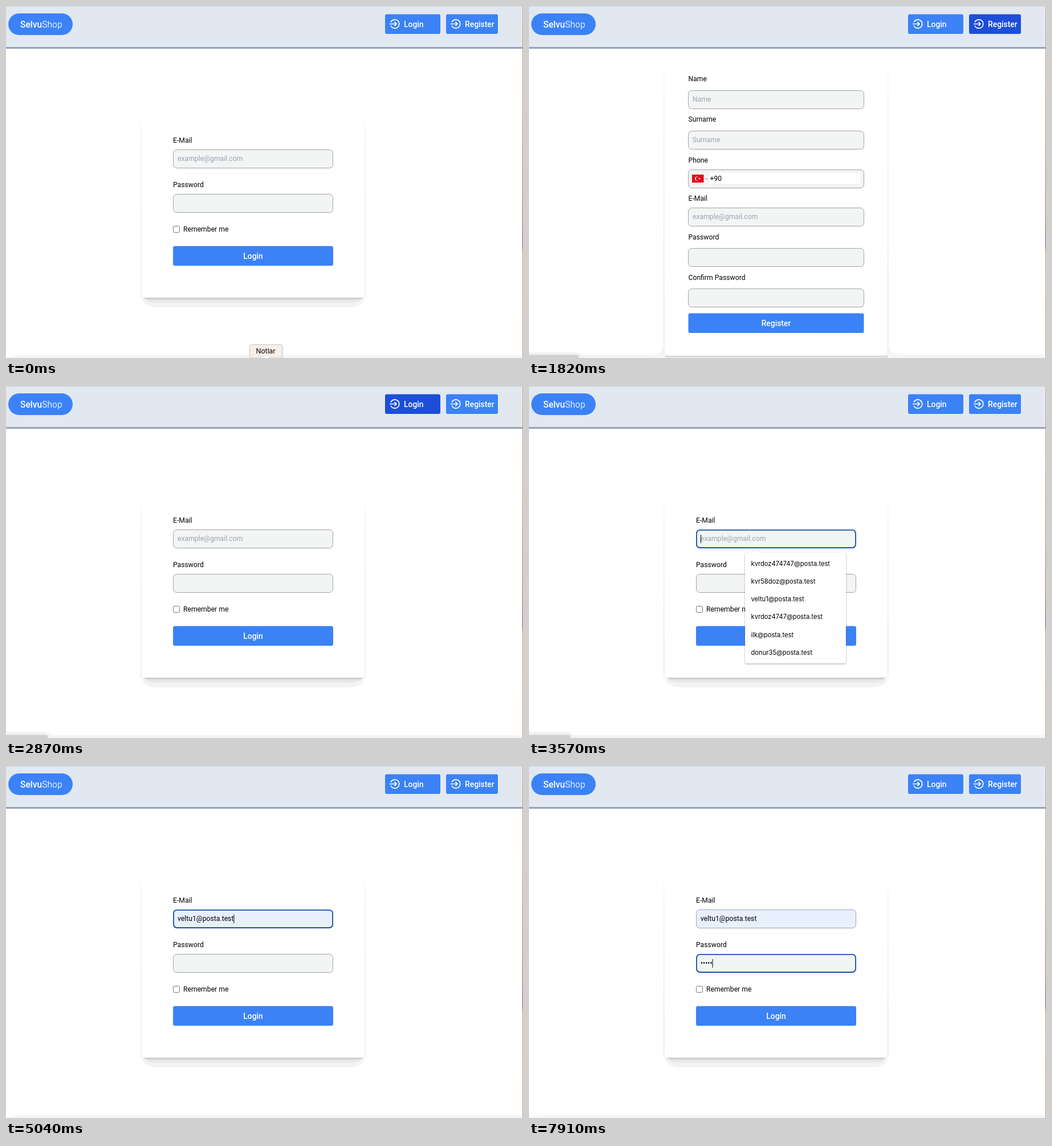
An HTML page that plays this animation: 907 px wide and 618 px high, repeating every 8000 ms.

```html
<!DOCTYPE html>
<html lang="en">
<head>
<meta charset="utf-8">
<title>Login and register</title>
<style>
  html, body { margin: 0; width: 100%; height: 100%; overflow: hidden; background: #fff; }
  svg { display: block; }
  text { font: 12.2px Roboto, sans-serif; white-space: pre; }
  .hint { fill: #9ca3af; }
  .big { font-size: 13.9px; font-weight: 500; fill: #fff; }
  .brand { font-size: 15.6px; font-weight: 500; fill: #fff; }
  .menu { font: 11.2px Inter, sans-serif; }
  .tip { font: 12px Inter, sans-serif; }
  .field { fill: #f3f4f4; stroke: #9ca3af; }
  .popup { filter: drop-shadow(0 1px 1.5px rgba(0, 0, 0, .35)); }
</style>
</head>
<body>
<svg id="stage" width="907" height="618" viewBox="0 0 907 618"></svg>
<script>
const LOOP = 8000, BLUE = '#3b82f6', DARK = '#1d4ed8';
const emails = ['kvrdoz474747', 'kvr58doz', 'veltu1', 'kvrdoz4747', 'ilk', 'donur35']
  .map(user => user + '@posta.test');

const rect = (x, y, w, h, fill, r = 0, more = '') =>
  `<rect x="${x}" y="${y}" width="${w}" height="${h}" fill="${fill}" rx="${r}" ${more}/>`;
const text = (x, y, str, more = '') => `<text x="${x}" y="${y}" ${more}>${str}</text>`;
const path = (d, fill, more = '') => `<path d="${d}" fill="${fill}" ${more}/>`;
const group = (id, body) => `<g id="${id}">${body}</g>`;
const field = (x, y, w, id = '') =>
  `<rect ${id && `id="${id}"`} class="field" x="${x + .5}" y="${y + .5}" width="${w - 1}" height="32" rx="6"/>`;
const wide = (x, y, w, label) =>
  rect(x, y, w, 34.5, BLUE, 3) + text(x + w / 2, y + 22, label, 'class="big" text-anchor="middle"');
const ring = (id, y) =>
  rect(294, y + .8, 279, 31.2, 'none', 6, `id="${id}" stroke="#1452ab" stroke-width="1.8"`);

function navButton(x, w, label, id) {
  return rect(x, 14.5, w, 34.5, BLUE, 3, `id="${id}"`) +
    `<g transform="translate(${x + 6.3} 21.1) scale(.867)" fill="none" stroke="#fff" stroke-width="1.9">
      <path d="M4.4 8.5A8.8 8.8 0 1 1 4.4 15.5M1.8 12H15.5M11.6 7.8L15.8 12L11.6 16.2"/></g>` +
    text(x + 33, 37, label, 'class="big"');
}

// Card sides fade in from the top; its shadow lies in flat bands.
const sides = (top, bottom) => [236, 629].map(x =>
  rect(x, top, 1.5, bottom - top, 'url(#side)')).join('');

const header =
  rect(0, 0, 907, 72, '#e2e8f0') + rect(0, 0, 907, 1, '#cdd3db') + rect(0, 72, 907, 3, '#94a3b8') +
  rect(4, 13, 113, 38, BLUE, 19) +
  text(25, 38, 'Selvu<tspan font-weight="400" fill="#dbeafe">Shop</tspan>', 'class="brand"') +
  navButton(665, 97, 'Login', 'navLogin') + navButton(772, 91, 'Register', 'navRegister');

const loginPage =
  path('M0 618Q10 613 45 613H907V618Z', '#f4f4f4') +
  path('M238 505V512Q241 529 268 529H600Q627 529 629 512V505Z', '#f3f3f3') +
  path('M241 505V512Q246 521 264 521H604Q621 521 626 512V505Z', '#e9e9e9') +
  path('M242 512H626L618 517H250Z', 'url(#edge)') +
  rect(237.5, 200, 391.5, 312, '#fff', 2) + sides(202, 512) +
  text(293, 240.4, 'E-Mail') + field(293, 252, 281, 'email') + ring('emailRing', 252) +
  text(301, 272.3, '', 'id="emailText"') + rect(301, 261, 1, 15, '#000', 0, 'id="emailCaret"') +
  text(293, 318.3, 'Password') + field(293, 330, 281) + ring('passRing', 330) +
  text(301, 350.3, '', 'id="passText"') + rect(301, 339, 1, 15, '#000', 0, 'id="passCaret"') +
  rect(293.5, 386.5, 11, 11, '#fff', 2, 'stroke="#767676"') + text(311, 396.2, 'Remember me') +
  wide(293, 421.5, 281, 'Login');

const star = Array.from({ length: 10 }, (_, i) => {
  const a = Math.PI * (1 + i / 5), r = i % 2 ? .8 : 2;
  return `${299 + r * Math.cos(a)},${303 + r * Math.sin(a)}`;
}).join(' ');

const phone =
  field(279, 287, 309) + rect(317, 293, 264, 19, '#fff') +
  rect(286, 296, 20.5, 14, '#e30a17') +
  '<circle cx="294.5" cy="303" r="3.6" fill="#fff"/><circle cx="295.5" cy="303" r="2.9" fill="#e30a17"/>' +
  `<polygon points="${star}" fill="#fff"/>` +
  path('M309.5 302.5L311.5 304.5L313.5 302.5', 'none', 'stroke="#555" stroke-width=".9"') +
  text(317.5, 307, '+90');

const registerPage =
  path('M0 612H212Q233 611 236 598V618H0ZM907 612H655Q634 611 631 598V618H907Z', '#f5f5f5') +
  rect(238, 610, 392, 8, '#e6e6e6') + rect(239, 613, 390, 2.5, '#cfcfcf') +
  rect(237.5, 108, 391.5, 506, '#fff', 3) + sides(108, 613) +
  [['Name', 128, 148, 'Name'], ['Surname', 199, 219, 'Surname'], ['Phone', 270.3],
   ['E-Mail', 338, 354, 'example@gmail.com'], ['Password', 405.5, 425, ''],
   ['Confirm Password', 476.5, 496, '']].map(([label, mid, y, hint]) =>
    text(279.5, mid + 4.4, label) +
    (y ? field(279, y, 309) + text(287, y + 20.2, hint, 'class="hint"') : phone)).join('') +
  wide(279.5, 539.5, 308, 'Register');

const rowY = i => 296.5 + 31.15 * i;
const menu =
  path('M382 292.5H391L398 286L405 292.5H553Q556 292.5 556 295.5V484Q556 487 553 487H382Q379 487 379 484V295.5Q379 292.5 382 292.5Z',
    '#fff', 'class="popup"') +
  rect(379, 0, 177, 31, '#e9e9ea', 0, 'id="row"') +
  emails.map((mail, i) => text(389.5, rowY(i) + 19.5, mail, 'class="menu"')).join('');

const tip =
  rect(427.5, 594.5, 57.5, 23.5, '#f6efe9', 4, 'stroke="#c9c4bf"') +
  path('M449 618L456 614.5L463 618Z', '#fff') + text(438.5, 610, 'Notlar', 'class="tip"');

const bubble =
  path('M0 607H66Q76 607 82 618H0Z', '#f3f3f3') +
  path('M0 612.5H70Q73 612.5 73 616V618H0Z', '#d0d0d0');
const longBubble =
  path('M0 608H78Q90 608 97 618H0Z', '#f1f1f1') +
  path('M0 612.5H84Q87 612.5 87 616V618H0Z', '#d0d0d0');

const stops = list => list.map(([o, c]) => `<stop offset="${o}" stop-color="${c}"/>`).join('');
const fade = (id, list) =>
  `<linearGradient id="${id}" x1="0" y1="0" x2="0" y2="1">${stops(list)}</linearGradient>`;

document.getElementById('stage').innerHTML =
  '<defs>' + fade('side', [[0, '#fafafa'], [.2, '#efefef'], [1, '#eaeaea']]) +
  fade('edge', [[0, '#c8c8c8'], [1, '#e6e6e6']]) +
  fade('rim', [[0, '#c8a98e'], [.3, '#c58a5e'], [.6, '#a8583c'], [.68, '#8c3a2c'], [.7, '#cf8c58'], [1, '#c99a72']]) +
  '</defs>' + header + group('loginPage', loginPage) + group('registerPage', registerPage) +
  group('menu', menu) + group('bubble', bubble) + group('longBubble', longBubble) +
  group('tip', tip) + rect(906, 0, 1, 618, 'url(#rim)');

const el = id => document.getElementById(id);
const show = (id, on) => el(id).style.display = on ? '' : 'none';
const alpha = (id, a) => el(id).style.opacity = Math.max(0, Math.min(1, a));
const within = (t, a, b) => t >= a && t < b;
const latest = (t, steps) => steps.reduce((v, [start, next]) => t >= start ? next : v, -1);

const hover = [[3780, 0], [3920, 1], [4060, 2], [4200, 3], [4690, 2]];
const keys = [6580, 6790, 7280, 7560, 7840];
const OPEN = 3500, PICK = 4970, PASS = 5810;

function draw(t) {
  const signUp = within(t, 1680, 2730), open = within(t, OPEN, PICK);
  const row = latest(t, hover), filled = row >= 0;

  show('tip', t < 70);
  show('loginPage', !signUp);
  show('registerPage', signUp);
  el('navRegister').setAttribute('fill', within(t, 1400, 2170) ? DARK : BLUE);
  el('navLogin').setAttribute('fill', within(t, 2520, 3150) ? DARK : BLUE);

  show('longBubble', within(t, 1680, 2730));
  alpha('longBubble', (t - 1610) / 140);
  show('bubble', within(t, 2730, 3850));
  alpha('bubble', (3850 - t) / 210);

  show('menu', open);
  show('row', filled);
  el('row').setAttribute('y', rowY(Math.max(row, 0)) - 3 + 2.5);

  const mail = el('emailText');
  mail.textContent = filled ? emails[row] : 'example@gmail.com';
  mail.setAttribute('class', filled ? '' : 'hint');
  el('email').style.fill = filled ? '#e8f0fe' : '';
  show('emailRing', within(t, OPEN, PASS));
  show('emailCaret', within(t, OPEN, 5530));
  if (!signUp) el('emailCaret').setAttribute('x', t < PICK ? 301 : 301 + mail.getComputedTextLength());

  const pass = el('passText');
  pass.textContent = '•'.repeat(keys.filter(k => t >= k).length);
  show('passRing', t >= PASS);
  show('passCaret', t >= PASS);
  if (t >= PASS) el('passCaret').setAttribute('x', 301 + pass.getComputedTextLength());
}

function tick() {
  draw(performance.now() % LOOP);
  requestAnimationFrame(tick);
}
tick();
</script>
</body>
</html>
```
